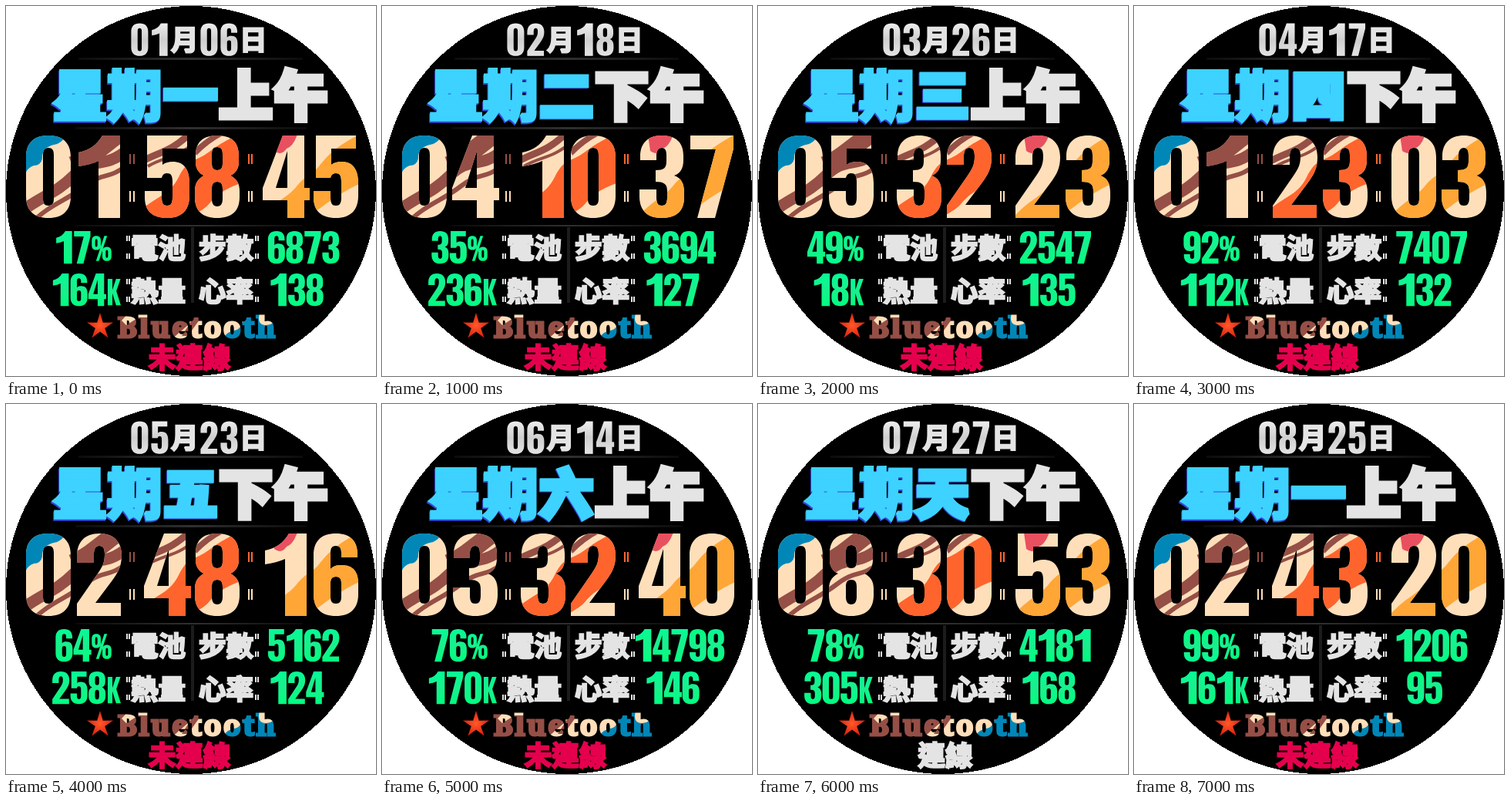
Write an HTML page that moves like this. It is 480 by 480 pixels and loops after 8 s.

```html
<!DOCTYPE html>
<html lang="zh-Hant">
<head>
<meta charset="utf-8">
<title>Watch face</title>
<style>
  html, body { margin: 0; width: 100%; height: 100%; overflow: hidden; background: #fff; }
  svg { display: block; width: 100vw; height: 100vh; }
  text { font-family: "Noto Sans CJK TC", "Noto Sans CJK", sans-serif; font-weight: 900; stroke-miterlimit: 2; }
  .label { fill: #e4e4e4; stroke: #e4e4e4; stroke-width: 2.4; font-size: 35.5px; }
  .big { font-size: 71px; stroke-width: 5; }
  .heavy { font-size: 67px; stroke-width: 9; letter-spacing: 4.5px; }
  .blue { fill: #3dd2ff; stroke: #3dd2ff; }
  .edge { fill: #3548d8; stroke: #3548d8; }
  .off { fill: #e5004d; stroke: #e5004d; }
  .brand { font: 900 37px "Noto Serif", serif; letter-spacing: 2.6px; fill: #fff; stroke: #fff; stroke-width: 3px; }
</style>
</head>
<body>
<svg viewBox="0 0 480 480" xmlns="http://www.w3.org/2000/svg">
  <defs id="defs">
    <linearGradient id="silver" x2="0" y2="1">
      <stop stop-color="#ededed"/><stop offset=".5" stop-color="#cfcfcf"/><stop offset="1" stop-color="#e4e4e4"/>
    </linearGradient>
    <linearGradient id="green" x2="0" y2="1">
      <stop stop-color="#06fa94"/><stop offset=".5" stop-color="#18f08c"/><stop offset="1" stop-color="#00ff80"/>
    </linearGradient>
    <linearGradient id="line" gradientUnits="userSpaceOnUse" x1="90" x2="390" y1="0" y2="0">
      <stop stop-color="#0a0a0a"/><stop offset=".5" stop-color="#303030"/><stop offset="1" stop-color="#0a0a0a"/>
    </linearGradient>
    <radialGradient id="star"><stop stop-color="#ff5a2a"/><stop offset="1" stop-color="#e0200f"/></radialGradient>
    <clipPath id="time"></clipPath>
    <mask id="word" maskUnits="userSpaceOnUse" x="130" y="390" width="230" height="60">
      <text class="brand" x="145" y="430">Bluetooth</text>
    </mask>
  </defs>

  <circle cx="240" cy="240" r="240" shape-rendering="crispEdges"/>
  <path fill="url(#line)" d="M94 67H385V70H94ZM90 157H390V160H90ZM90 284H385V286H90Z"/>
  <path fill="#1c1c1c" d="M240 287h4v98h-4z"/>

  <g id="date" fill="url(#silver)"></g>
  <text class="label" x="214" y="57">月</text>
  <text class="label" x="303" y="57">日</text>

  <g id="week" transform="translate(0 142)">
    <text class="label big edge" x="59.500" y="1.500">星期</text>
    <text class="label big heavy edge day" x="205" y="0"></text>
    <text class="label big blue" x="60.500">星期</text>
    <text class="label big heavy blue day" x="206" y="-1.500"></text>
    <text class="label big heavy" id="half" x="277.500" y="-1.500"></text>
  </g>

  <g clip-path="url(#time)">
    <path fill="#ffdfba" d="M20 160H460V280H20Z"/>
    <g fill="none" stroke="#954f46">
      <path stroke-width="15" d="M16 270C44 246 62 246 88 220S126 212 156 188"/>
      <path stroke-width="6" d="M30 284C58 256 76 254 102 234S132 226 156 207"/>
      <path stroke-width="24" d="M86 207C104 200 120 186 148 164"/>
      <path stroke-width="9" d="M176 202C196 190 214 190 240 164"/>
      <path stroke-width="4" d="M184 208C205 195 222 198 246 176"/>
    </g>
    <path fill="#0087b8" d="M20 160H80Q76 178 62 180Q46 184 47 198Q45 207 36 207Q27 210 25 219H20Z"/>
    <path fill="#ff642d" d="M174 266C196 246 212 246 224 222S244 202 258 193S270 182 310 162V228C286 236 274 244 264 256S246 266 236 280H174Z"/>
    <path fill="#954f46" d="M244 186Q258 172 274 164H290Q266 174 247 194Z"/>
    <path fill="#e9505f" d="M344 160H380Q374 182 364 185Q357 195 348 188Z"/>
    <path fill="#ffa636" d="M330 276C350 252 364 250 377 234S396 220 406 208S424 184 460 166V230C438 240 424 250 412 259S396 268 388 280Z"/>
  </g>
  <path fill="#954f46" d="M160 192h2v13h-2zm5 0h2v13h-2z"/>
  <path fill="#ffdfba" d="M160 240h2v14h-2zm5 0h2v14h-2z"/>
  <path fill="#ff642d" d="M314 192h2v13h-2zm4 0h2v13h-2z"/>
  <path fill="#ffdfba" d="M314 240h2v14h-2zm4 0h2v14h-2z"/>

  <text class="label" x="162" y="327">電池</text>
  <text class="label" x="250" y="327">步數</text>
  <text class="label" x="162" y="383">熱量</text>
  <text class="label" x="250" y="383">心率</text>
  <g id="marks" fill="#e4e4e4"></g>
  <g id="stats" fill="url(#green)"></g>

  <path id="spark" fill="url(#star)"/>
  <g mask="url(#word)">
    <path fill="#ffdfba" d="M140 395H350V440H140Z"/>
    <path fill="#954f46" d="M140 395H162L150 408L156 414L172 404H228L236 414L206 440H140ZM228 428L246 400H256L236 428Z"/>
    <path fill="#0087b8" d="M278 440Q283 423 296 421T309 395H330Q324 413 336 414T352 402V440Z"/>
  </g>
  <text class="label" id="link" x="238" y="469" text-anchor="middle"></text>
</svg>
<script>
const NS = 'http://www.w3.org/2000/svg';
const $ = id => document.getElementById(id);
const add = (parent, tag, attrs) => {
  const el = document.createElementNS(NS, tag);
  for (const k in attrs) el.setAttribute(k, attrs[k]);
  return parent.appendChild(el);
};

// Condensed numerals in a 60 x 107 cell
const six = 'M58 31H37V25C37 19 35 16 30 16S23 19 23 25V46C27 42 31 41 37 41C52 41 59 49 59 65V79C59 97 49 107 30 107S1 97 1 79V28C1 10 11 0 30 0S58 10 58 27ZM30 56C25 56 23 59 23 64V82C23 88 25 91 30 91S37 88 37 82V64C37 59 35 56 30 56Z';
const glyphs = {
  0: 'M30 0C49 0 59 10 59 28V79C59 97 49 107 30 107S1 97 1 79V28C1 10 11 0 30 0ZM30 16C25 16 23 19 23 25V82C23 88 25 91 30 91S37 88 37 82V25C37 19 35 16 30 16Z',
  1: 'M34 0H57V107H29V33Q18 38 3 40V22Q24 18 34 0Z',
  2: 'M1 38V30C1 11 11 0 30 0C48 0 59 10 59 28C59 42 55 50 46 62L25 90H58V107H1V91L28 52C34 43 37 38 37 27C37 19 35 16 30 16S23 20 23 28V38Z',
  3: 'M2 32V27C2 10 12 0 30 0S58 9 58 26V32C58 43 54 49 46 52C55 55 59 62 59 74V80C59 98 49 107 30 107S1 97 1 79V70H23V80C23 88 25 91 30 91S37 88 37 80V72C37 63 33 60 22 60V45C33 45 36 42 36 33V25C36 19 34 16 30 16S23 19 23 26V32Z',
  4: 'M26 0H54V68H61V84H54V107H32V84H0V68ZM32 68V20L17 68Z',
  5: 'M4 0H56V17H24V38C28 35 32 34 37 34C52 34 59 44 59 62V78C59 97 49 107 30 107S1 98 1 80V72H23V80C23 88 25 91 30 91S37 88 37 80V60C37 52 35 49 30 49C26 49 24 51 23 55H4Z',
  6: six,
  7: 'M2 0H58V17L34 107H11L35 18H2Z',
  8: 'M30 0C49 0 58 9 58 26V34C58 43 54 49 47 52C55 56 59 62 59 72V80C59 98 49 107 30 107S1 98 1 80V72C1 62 5 56 13 52C6 49 2 43 2 34V26C2 9 11 0 30 0ZM30 15C25 15 23 18 23 24V36C23 42 25 45 30 45S37 42 37 36V24C37 18 35 15 30 15ZM30 60C25 60 23 63 23 69V82C23 88 25 92 30 92S37 88 37 82V69C37 63 35 60 30 60Z',
  9: six,
  K: 'M2 18H20V55L34 18H51L35 59L52 107H34L20 67V107H2Z',
  '%': 'M18 16C29 16 34 22 34 32V46C34 56 29 62 18 62S2 56 2 46V32C2 22 7 16 18 16ZM18 26Q14 26 14 32V46Q14 52 18 52T22 46V32Q22 26 18 26ZM46 16H56L27 98H17ZM55 52C66 52 71 58 71 68V82C71 92 66 98 55 98S39 92 39 82V68C39 58 44 52 55 52ZM55 62Q51 62 51 68V82Q51 88 55 88T59 82V68Q59 62 55 62Z'
};
for (const c in glyphs) {
  const p = add($('defs'), 'path', { id: 'g' + c, d: glyphs[c], 'fill-rule': 'evenodd', 'clip-rule': 'evenodd' });
  if (c === '9') p.setAttribute('transform', 'rotate(180 30 53.5)');
}

const put = (parent, c, x, y, sx, sy = sx) =>
  add(parent, 'use', { href: '#g' + c, transform: `translate(${x} ${y}) scale(${sx} ${sy})` });
const row = (parent, str, x, y, pitch) =>
  [...str].forEach((c, i) => put(parent, c, x + i * pitch, y, .38, .395));
const centered = (parent, str, mid, y) => row(parent, str, mid - str.length * 11.75, y, 23.5);

for (const x of [156, 323]) for (const y of [298, 354])
  add($('marks'), 'path', { d: `M${x} ${y}h2v7h-2zm0 23h2v7h-2zm3-23h2v7h-2zm0 23h2v7h-2z` });

$('spark').setAttribute('d', 'M' + Array.from({ length: 10 }, (_, i) => {
  const a = i * Math.PI / 5 - Math.PI / 2, r = i % 2 ? 6.5 : 18;
  return (122 + r * Math.cos(a)).toFixed(1) + ' ' + (416 + r * Math.sin(a)).toFixed(1);
}).join('L') + 'Z');

// date, weekday, half of day, time, battery, steps, calories, pulse, linked
const steps = [
  ['0106', '一', '上', '015845', '17', '6873', '164', '138'],
  ['0218', '二', '下', '041037', '35', '3694', '236', '127'],
  ['0326', '三', '上', '053223', '49', '2547', '18', '135'],
  ['0417', '四', '下', '012303', '92', '7407', '112', '132'],
  ['0523', '五', '下', '024816', '64', '5162', '258', '124'],
  ['0614', '六', '上', '033240', '76', '14798', '170', '146'],
  ['0727', '天', '下', '083053', '78', '4181', '305', '168', true],
  ['0825', '一', '上', '024320', '99', '1206', '161', '95']
];
const cells = [25, 91, 179, 244, 333, 398];

function show([date, day, half, time, battery, count, heat, pulse, linked]) {
  for (const id of ['date', 'time', 'stats']) $(id).replaceChildren();
  row($('date'), date.slice(0, 2), 162, 22.5, 26);
  row($('date'), date.slice(2), 252, 22.5, 26);
  document.querySelectorAll('.day').forEach(el => el.textContent = day);
  $('half').textContent = half + '午';
  [...time].forEach((c, i) => put($('time'), c, cells[i], 168, 1));
  const stats = $('stats');
  centered(stats, battery, 87.5, 292);
  put(stats, '%', 110.5, 292, .37, .395);
  centered(stats, count, 386.5, 292);
  centered(stats, heat, 95, 347);
  put(stats, 'K', 96 + heat.length * 11.75, 347, .34, .385);
  centered(stats, pulse, 377.5, 347);
  const link = $('link');
  link.textContent = linked ? '連線' : '未連線';
  link.setAttribute('x', linked ? 243 : 238);
  link.classList.toggle('off', !linked);
}

let current = -1;
function tick() {
  const i = Math.floor(performance.now() % 8000 / 1000);
  if (i !== current) show(steps[current = i]);
  requestAnimationFrame(tick);
}
tick();
</script>
</body>
</html>
```
